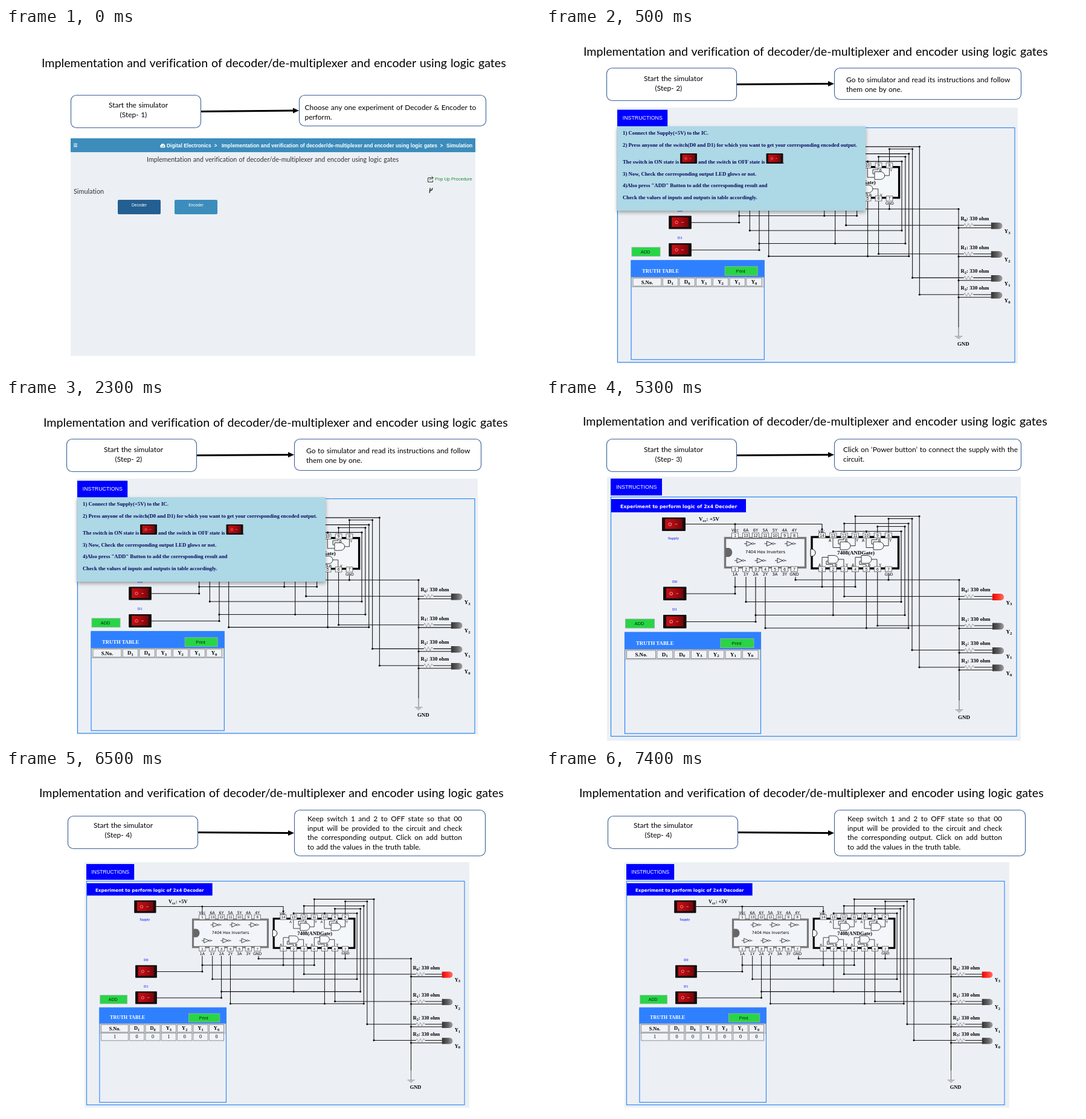
Write an HTML page that moves like this. It is 884 by 569 pixels and loops after 8 s.

```html
<!DOCTYPE html>
<html lang="en">
<head>
<meta charset="utf-8">
<title>Decoder and encoder simulator steps</title>
<style>
html, body { margin: 0; width: 100%; height: 100%; overflow: hidden; background: #fff; }
svg { display: block; width: 884px; height: 569px; }
text { white-space: pre; font-variant-ligatures: none; }
.lato { font-family: Lato, sans-serif; word-spacing: .047em; }
.sans { font-family: "Liberation Sans", Arial, sans-serif; }
.serif { font-family: "Liberation Serif", "Times New Roman", serif; }
.wide { font-family: "DejaVu Sans", Verdana, sans-serif; }
.b { font-weight: bold; }
.m { text-anchor: middle; }
.just div { font: 11.95px/15.7px Lato, sans-serif; font-variant-ligatures: none; text-align: justify; text-align-last: justify; white-space: nowrap; }
.just div:last-child { text-align-last: left; word-spacing: .047em; }
.wire { fill: none; stroke: #111; stroke-width: 1.1; }
.thin { fill: none; stroke: #333; stroke-width: 1; }
.gate { fill: #f8fafc; stroke: #333; }
</style>
</head>
<body>
<svg id="stage" viewBox="0 0 884 569" xmlns="http://www.w3.org/2000/svg">
  <defs>
    <linearGradient id="on"><stop offset="0" stop-color="#d80d0d"/><stop offset=".45" stop-color="#ff2a22"/><stop offset="1" stop-color="#ff7068"/></linearGradient>
    <linearGradient id="off"><stop offset="0" stop-color="#333"/><stop offset=".5" stop-color="#5c5c5c"/><stop offset="1" stop-color="#a2a2a2"/></linearGradient>
    <linearGradient id="rocker"><stop offset="0" stop-color="#c41016"/><stop offset=".5" stop-color="#aa0a10"/><stop offset="1" stop-color="#74060a"/></linearGradient>
    <filter id="shade" x="-5%" y="-10%" width="110%" height="125%"><feDropShadow dx="0" dy="3" stdDeviation="3" flood-opacity=".35"/></filter>
  </defs>
</svg>
<script>
const TITLE = 'Implementation and verification of decoder/de-multiplexer and encoder using logic gates';
const PAGE = '#ecf0f5', BLUE = '#0000ff', PANEL = '#2f80ff', GREEN = '#27d545', SKY = '#3c8dbc';
const BODY = 11.95;

const join = (list, fn) => list.map(fn).join('');
const times = (n, fn) => join([...Array(n).keys()], fn);
const esc = s => String(s).replace(/&/g, '&amp;').replace(/</g, '&lt;').replace(/>/g, '&gt;');
const text = (x, y, s, size, cls, fill = '#000') =>
  `<text x="${x}" y="${y}" font-size="${size}" class="${cls}" fill="${fill}">${esc(s)}</text>`;
const subText = (x, y, head, low, tail = '', cls = 'serif b') =>
  `<text x="${x}" y="${y}" font-size="9" class="${cls}">${head}<tspan dy="1.8" font-size="6.8">${low}</tspan><tspan dy="-1.8">${tail}</tspan></text>`;
const rect = (x, y, w, h, fill, more = '') =>
  `<rect x="${x}" y="${y}" width="${w}" height="${h}" fill="${fill}" ${more}/>`;
const path = (d, cls = 'wire', more = '') => `<path d="${d}" class="${cls}" ${more}/>`;
const dot = (x, y) => `<circle cx="${x}" cy="${y}" r="1.6"/>`;

// Title, two rounded boxes and the arrow between them
function heading({ title, box: [bx, by], note: [nx, ny, nw, nh], start: [sx, sy], inset: [ix, iy], lines, justify }, step) {
  const frame = (x, y, w, h) => rect(x + .5, y + .5, w, h, '#fff', 'rx="9" stroke="#3a5f95" stroke-width="1.1"');
  const y1 = by + 27.5, y2 = ny + nh / 2 + .5;
  const rows = justify
    ? `<foreignObject x="${nx + ix}" y="${ny + iy - 12}" width="256" height="70"><div xmlns="http://www.w3.org/1999/xhtml" class="just">${join(lines, s => `<div>${s}</div>`)}</div></foreignObject>`
    : join(lines, (s, i) => text(nx + ix, ny + iy + 16 * i, s, BODY, 'lato'));
  return text(...title, TITLE, 19.65, 'lato') + frame(bx, by, 215, 54) + frame(nx, ny, nw, nh) +
    path(`M${bx + 216} ${y1}L${nx - 8} ${y2}`, '', 'stroke="#000" stroke-width="3"') +
    path(`M${nx - 10} ${y2 - 4.5}l10 4.5l-10 4.5z`, '') +
    text(bx + sx, by + sy, 'Start the simulator', BODY, 'lato') +
    text(bx + sx + 18.5, by + sy + 16, `(Step- ${step})`, BODY, 'lato') + rows;
}

function rocker(x, y, w, h) {
  const u = w / 38, mid = y + h / 2;
  return rect(x, y, w, h, '#160e0e', 'rx="1"') +
    rect(x + 5 * u, y + 2.5 * u, w - 10 * u, h - 6 * u, 'url(#rocker)') +
    `<circle cx="${x + 13 * u}" cy="${mid}" r="${2.3 * u}" fill="none" stroke="#e88" stroke-width="${u}"/>` +
    path(`M${x + 21 * u} ${mid}h${4 * u}`, '', `stroke="#e77" stroke-width="${u}"`);
}

const button = (x, y, w, h, label, size) =>
  rect(x + .5, y + .5, w - 1, h - 1, GREEN, 'stroke="#8fb59a"') +
  text(x + w / 2 - 1, y + h / 2 + 2.8, label, size, 'sans m', '#06280e');

// Pin columns of the two chips
const col1 = i => i ? 315 + 16 * i : 313;
const col2 = i => 457 + 18.35 * i;

const pin = (x, y, n) =>
  rect(x - 5.5, y - 4.5, 11, 8.5, '#f6f8fa', 'stroke="#555" stroke-width=".8"') + text(x, y + 2.3, n, 6.6, 'sans m');
const pins = (col, first) => times(7, i => pin(col(i), 226.5, i ? 14 - i : first) + pin(col(i), 282.5, i + 1));

function inverterChip() {
  const names = ['Vcc 6A 6Y 5A 5Y 4A 4Y', '1A 1Y 2A 2Y 3A 3Y GND'];
  const gate = (x, y) => path(`M${x - 6} ${y - 4}v8l9 -4zM${x - 10} ${y}h4M${x + 6} ${y}h3`, 'thin') +
    `<circle cx="${x + 4.4}" cy="${y}" r="1.5" fill="#fff" stroke="#333" stroke-width=".8"/>`;
  return rect(296.5, 230.5, 133, 49, '#f1f4f8', 'stroke="#777" stroke-width="3.4"') +
    path('M297 247h6a8 8 0 0 1 0 15h-6z', '', 'fill="#666"') + pins(col1, 1) +
    join(names, (row, r) => join(row.split(' '), (s, i) => text(col1(i), 220.4 + 73 * r, s, 6.8, 'wide m'))) +
    times(3, i => gate(338 + 33.5 * i, 240) + gate(322 + 33.5 * i, 268)) +
    text(330, 256, '7404 Hex Inverters', 6.9, 'wide');
}

function andChip() {
  const gate = (x, y) => path(`M${x - 10} ${y - 6.5}h10a7 6.5 0 0 1 0 13h-10z`, 'gate');
  const pair = d =>
    path(`M${475 + d} 231v15.5h12M${493 + d} 231v2.5h-9v7h4M${504 + d} 243.5h8v-12.5`, 'thin') +
    path(`M${457 + d} 278v-15.5h11M${475 + d} 278v-3.5h-11v-5.5h4M${484 + d} 266h9v12`, 'thin') +
    gate(497 + d, 243.5) + gate(477 + d, 266) +
    join([0, 27, 45], (x, i) => text(470 + d + x, 237, 'ABY'[i], 6.3, 'sans m') + text(453 + d + x, 278, 'ABY'[i], 6.3, 'sans m'));
  return rect(440, 229, 143.5, 52, '#f4f7fa', 'stroke="#000" stroke-width="3.4"') +
    path('M438 249h2a6 6 0 0 1 0 12h-2z', '', 'fill="#fff" stroke="#000"') + pins(col2, 14) + pair(0) + pair(55) +
    text(456, 222, 'Vcc', 6.2, 'wide m') + text(567.5, 292.5, 'GND', 6.2, 'wide m') +
    text(482, 258, '7408(ANDGate)', 9, 'serif b');
}

// Each net leaves one inverter pin, meets lower AND pins, then climbs a bus to upper pins
const nets = [
  { y: 311.5, feed: 323, low: [0, 3], top: [] },
  { y: 336.5, low: [], top: [1, 4], over: 219.5 },
  { y: 358.5, feed: 369.5, low: [1], top: [5], over: 211.5 },
  { y: 380, low: [4], top: [2], over: 206.5 }
];
const leds = [
  { y: 327.5, pin: 2 },
  { y: 376, pin: 5 },
  { y: 416.5, pin: 6, bus: 606, over: 198.5 },
  { y: 445, pin: 3, bus: 618, over: 194.5 }
];

function wires() {
  let d = 'M231 207.5H457V222M313 207.5V222M413 295V300H684V500M567 292V300';
  let dots = dot(313, 207.5) + dot(457, 216) + dot(413, 300) + dot(567, 300) + dot(684, 300);
  nets.forEach(({ y, feed, low, top, over }, k) => {
    const x = col1(k), bus = 582 + 6 * k;
    d += `M${x} 295V${feed || y}M${x} ${y}H${top.length ? bus : col2(3)}`;
    dots += dot(x, y);
    if (feed) { d += `M232 ${feed}H${x}`; dots += dot(x, feed); }
    low.forEach(i => { d += `M${col2(i)} 286V${y}`; dots += dot(col2(i), y); });
    if (top.length) { d += `M${bus} ${y}V${over}H${col2(top[0])}`; dots += dot(bus, y) + dot(bus, over); }
    top.forEach(i => { d += `M${col2(i)} ${over}V222`; dots += dot(col2(i), over); });
  });
  leds.forEach(({ y, pin, bus, over }) => {
    const x = col2(pin);
    d += bus ? `M${x} 222V${over}H${bus}V${y}H693` : `M${x} 286V${y}H693`;
    dots += dot(bus || x, y) + (bus ? dot(x, over) + dot(bus, over) : '');
  });
  return path(d) + dots;
}

function outputs(lit) {
  return join(leds, ({ y }, i) =>
    path(`M693 ${y}l1.5 -3l3 6l3 -6l3 6l3 -6l2 3`, 'thin', 'style="stroke:#999"') +
    path(`M709 ${y}H740M684 ${y + 4.5}H740`) + dot(684, y + 4.5) +
    path(`M739 ${y - 4.5}h14q5 1 5 5.5t-5 5.5h-14z`, '', `fill="url(#${lit && !i ? 'on' : 'off'})"`) +
    subText(687.5, y - 8.3, 'R', i, ': 330 ohm') + subText(761.5, y + 13, 'Y', 3 - i)) +
    path('M684 498V515', 'thin', 'style="stroke:#666"') +
    path('M677.5 515.5h13M680 517.5h8M682.5 519.5h3', 'thin', 'style="stroke:#888"') +
    text(682, 531, 'GND', 9, 'serif b');
}

function table(row) {
  const heads = ['D1', 'D0', 'Y3', 'Y2', 'Y1', 'Y0'];
  const cell = (i, y, label) => {
    const x = i ? 155 + 28.3 * i : 133, w = i ? 27 : 49;
    return rect(x + .5, y + .5, w - 1, 13.5, '#f0f3f7', 'stroke="#8a8a8a"') + label(x + w / 2);
  };
  return rect(130.5, 387, 225, 168, 'none', `stroke="${PANEL}" stroke-width="1.2"`) +
    rect(130, 387, 225.5, 28.5, PANEL) +
    text(149, 407.5, 'TRUTH TABLE', 8.8, 'serif b', '#fff') + button(288.5, 397, 56, 16, 'Print', 7.8) +
    rect(131, 415.5, 224, 16.5, '#dfe3e8', 'stroke="#999" stroke-width=".8"') +
    cell(0, 416.5, x => text(x, 427, 'S.No.', 8.8, 'serif b m')) +
    join(heads, (h, i) => cell(i + 1, 416.5, x => subText(x, 426.5, ...h, '', 'serif b m'))) +
    join([...row], (n, i) => cell(i, 431.5, x => text(x, 441.7, n, 8.8, 'serif m')));
}

// The simulator panel is laid out once and placed by its frame rectangle
function circuit({ page, frame: [x, y, w, h], lit = true, row = '' }) {
  const sx = w / 672, sy = h / 397;
  return rect(...page, PAGE) +
    `<g transform="matrix(${sx} 0 0 ${sy} ${x - 107 * sx} ${y - 162 * sy})">` +
    rect(107.5, 162.5, 671.5, 397, 'none', 'stroke="#2f86f0" stroke-width="1.2"') +
    rect(107, 132, 85, 28, BLUE) + text(116, 148.7, 'INSTRUCTIONS', 9, 'sans', '#fff') +
    rect(108, 166, 223, 22, BLUE) +
    text(123, 181, 'Experiment to perform logic of 2x4 Decoder', 7.8, 'wide b', '#fff') +
    wires() + inverterChip() + andChip() + outputs(lit) +
    subText(253, 202, 'V', 'cc', ': +5V') + rocker(192, 196.5, 39, 22.5) +
    text(211, 233, 'Supply', 6.6, 'serif m', BLUE) +
    times(2, i => rocker(194, 311.5 + 46.5 * i, 38.5, 22.5) + text(213, 304.5 + 46.5 * i, 'D' + i, 6.6, 'serif m', BLUE)) +
    button(131, 364.5, 49, 16, 'ADD', 7.5) + table(row) + '</g>';
}

function popup() {
  const line = (x, y, s) => text(x, y, s, 8.75, 'serif b', '#08085e');
  const lines = [
    '1) Connect the Supply(+5V) to the IC.',
    '2) Press anyone of the switch(D0 and D1) for which you want to get your corresponding encoded output.',
    'The switch in ON state is',
    '3) Now, Check the corresponding output LED glows or not.',
    '4)Also press "ADD" Button to add the corresponding result and',
    'Check the values of inputs and outputs in table accordingly.'
  ];
  return rect(118, 163, 411, 140, '#add8e6', 'filter="url(#shade)"') +
    join(lines, (s, i) => line(127, 177 + 19.7 * i + (i > 1 ? 8.6 : 0), s)) +
    rocker(222, 208, 28, 17) + line(252, 225, 'and the switch in OFF state is') +
    rocker(364.5, 208, 28, 17) + line(392, 225, '.');
}

function startPage() {
  const bold = (x, s) => text(x, 198, s, 8.46, 'sans b', '#fff');
  const choice = (x, s, fill) => rect(x, 285, 71, 24, fill, 'rx="2"') + text(x + 35.5, 296, s, 6.6, 'sans m', '#fff');
  return rect(107, 183, 670, 361, PAGE) + rect(107, 183, 670, 23, SKY) +
    path('M112 192h6m-6 2.3h6m-6 2.3h6', '', 'stroke="#fff" stroke-width="1.1"') +
    path('M256.4 198.6a4 4 0 1 1 6.2 0z', '', 'fill="#fff"') +
    path('M259.5 198l1.5 -4m-3.6 2.5h1m2.8 0h1', '', `stroke="${SKY}" stroke-width=".9"`) +
    bold(266, 'Digital Electronics') + bold(344.5, '>') + bold(357, TITLE) + bold(718.5, '>') + bold(729, 'Simulation') +
    text(233, 222, TITLE, 10.67, 'lato', '#333') + text(112, 274.5, 'Simulation', 10.9, 'lato', '#333') +
    path('M704 248.5h-5.5v7h8v-3m-5 0q.5 -4 5.5 -4m-2.5 -2.5l3 2.5l-3 2.5', 'thin') +
    text(710, 253, 'Pop Up Procedure', 7.5, 'sans', '#1f8a2c') +
    path('M702.2 265.5l-1 8m.8 -4q3.5 .5 3.8 -4', '', 'fill="none" stroke="#222" stroke-width="1.5"') +
    choice(185, 'Decoder', '#245f92') + choice(279, 'Encoder', SKY);
}

const scenes = [
  {
    from: 0, title: [59, 65], box: [107, 111], note: [485, 111, 309, 51], start: [63, 21], inset: [9.5, 25],
    lines: ['Choose any one experiment of Decoder & Encoder to', 'perform.'],
    body: startPage
  },
  {
    from: 500, title: [62, 46], box: [100, 66], note: [477, 66, 309, 52], start: [62, 22], inset: [20, 24],
    lines: ['Go to simulator and read its instructions and follow', 'them one by one.'],
    page: [117, 132, 664, 425], frame: [118, 165, 658, 389], lit: false,
    body: s => circuit(s) + popup()
  },
  {
    from: 3500, title: [61, 44], box: [100, 66], note: [477, 66, 309, 52], start: [62, 22], inset: [15, 22],
    lines: ['Click on ‘Power button’ to connect the supply with the', 'circuit.'],
    page: [101, 129, 685, 438], frame: [107, 162, 672, 397],
    body: circuit
  },
  {
    from: 6500, title: [55, 45], box: [102, 76], note: [477, 66, 316, 76], start: [43, 20], inset: [22, 19], justify: true,
    lines: ['Keep switch 1 and 2 to OFF state so that 00', 'input will be provided to the circuit and check',
      'the corresponding output. Click on add button', 'to add the values in the truth table.'],
    page: [130, 153, 637, 407], frame: [133, 184, 626, 371], row: '1001000',
    body: circuit
  }
];

const stage = document.getElementById('stage');
stage.insertAdjacentHTML('beforeend', join(scenes, (s, i) => `<g display="none">${heading(s, i + 1)}${s.body(s)}</g>`));
const groups = [...stage.children].slice(1);
const LOOP = 8000;
let begin = null;

function draw(ms) {
  const t = ms % LOOP;
  const current = scenes.filter(s => s.from <= t).length - 1;
  groups.forEach((g, i) => g.setAttribute('display', i === current ? 'inline' : 'none'));
}

function tick(now) {
  if (begin === null) begin = now;
  draw(Math.max(0, now - begin));
  requestAnimationFrame(tick);
}
draw(0);
requestAnimationFrame(tick);
</script>
</body>
</html>
```
